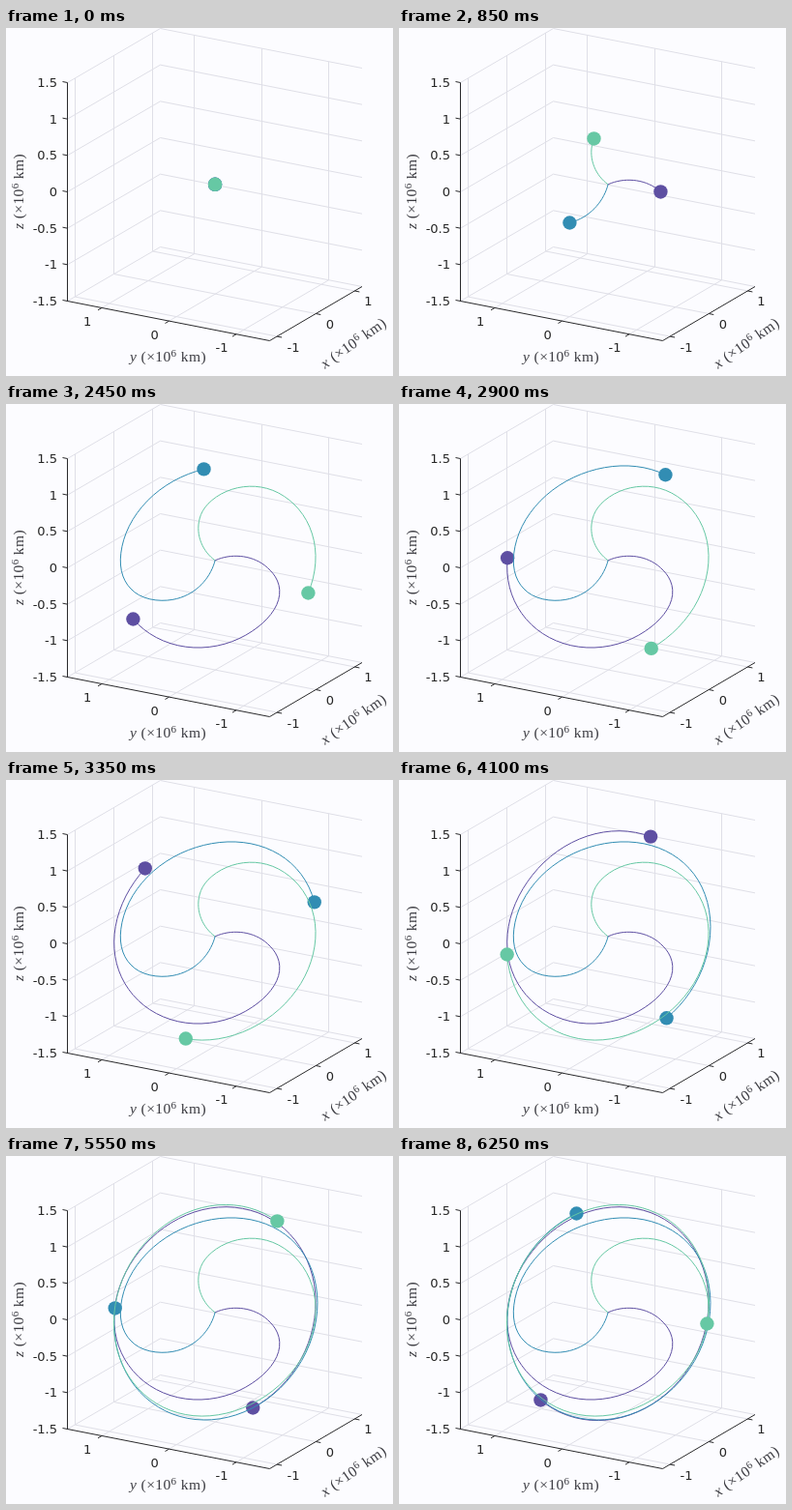
An HTML page for the animation above (6.3 s loop, 400 px wide and 360 px high).

```html
<!DOCTYPE html>
<html lang="en">
<head>
<meta charset="utf-8">
<title>Three-body orbit plot</title>
<style>
  html, body { margin: 0; width: 100%; height: 100%; overflow: hidden; background: #fcfcff; }
  svg { display: block; width: 400px; height: 360px; }
  .grid line { stroke: #dfdfe7; stroke-width: 1; }
  .axes line { stroke: #2a2a2c; stroke-width: 1; }
  .ticks text { font: 13px "DejaVu Sans", sans-serif; fill: #262626; }
  .names text { font: 15.5px "Liberation Serif", serif; letter-spacing: 0.4px; fill: #3c3c42; text-anchor: middle; }
  .var { font-style: italic; }
  .sup { font-size: 11px; }
  .trail { fill: none; stroke-width: 1; stroke-linejoin: round; }
</style>
</head>
<body>
<svg viewBox="0 0 400 360">
  <g class="grid"></g>
  <g class="axes"></g>
  <g class="ticks"></g>
  <g class="names"></g>
  <g class="craft"></g>
</svg>
<script>
const LOOP = 6300, STEP = 50, TURN = Math.PI * 2;

function add(parent, tag, attrs, text) {
  const el = document.createElementNS("http://www.w3.org/2000/svg", tag);
  for (const key in attrs) el.setAttribute(key, attrs[key]);
  if (text !== undefined) el.textContent = text;
  return parent.appendChild(el);
}
const group = name => document.querySelector("." + name);
const line = (parent, x1, y1, x2, y2) => add(parent, "line", { x1, y1, x2, y2 });

const grid = group("grid"), axes = group("axes"), ticks = group("ticks");
const label = (x, y, text, anchor = "middle") =>
  add(ticks, "text", { x, y, "text-anchor": anchor }, text);

// Box corners on the floor
const left = [63.5, 282.5], front = [272.5, 323.5], right = [368, 267.5], back = [159.5, 226.5];
const height = 226;

const mix = (a, b, k) => [a[0] + (b[0] - a[0]) * k, a[1] + (b[1] - a[1]) * k];

// A grid line across the floor that continues up the wall
function floorAndWall([fx, fy], [bx, by]) {
  const x = Math.floor(bx) + 0.5;
  line(grid, fx, fy, bx, by);
  line(grid, x, by, x, by - height);
}

// z levels on the two back walls
[-1.5, -1, -0.5, 0, 0.5, 1, 1.5].forEach((z, i) => {
  const up = i * height / 6;
  line(grid, left[0], left[1] - up, back[0], back[1] - up);
  line(grid, back[0], back[1] - up, right[0], right[1] - up);
  line(axes, left[0], left[1] - up, left[0] - 5, left[1] - up - 1);
  label(53, left[1] - up + 4.5, z, "end");
});

// y values run from left to front
[1, 0, -1].forEach((v, i) => {
  const k = 0.17 + i * 0.3325;
  const [x, y] = mix(left, front, k);
  floorAndWall([x, y], mix(back, right, k));
  line(axes, x, y, x - 4, y + 2.4);
  label(x - 15, y + 18.7, v);
});

// x values run from front to right
[[-1, 297, 335], [0, 335, 311], [1, 374.5, 287]].forEach(([v, tx, ty], i) => {
  const k = 0.08 + i * 0.42;
  const [x, y] = mix(front, right, k);
  floorAndWall([x, y], mix(left, back, k));
  line(axes, x, y, x + 5, y + 1);
  label(tx, ty, v);
});

line(axes, left[0], left[1] + 0.5, left[0], left[1] - height);
line(axes, ...left, ...front);
line(axes, ...front, ...right);

function axisName(name, x, y, angle) {
  const text = add(group("names"), "text", { transform: `translate(${x} ${y}) rotate(${angle})` });
  add(text, "tspan", { class: "var" }, name);
  add(text, "tspan", {}, " (×10");
  add(text, "tspan", { class: "sup", dy: -5 }, "6");
  add(text, "tspan", { dy: 5 }, " km)");
}
axisName("z", 18, 169, -90);
axisName("y", 167.5, 345, 0);
axisName("x", 362, 330, -35);

// Formation over time: ms, radius, angle in degrees, distortion (two parts)
const keys = [
  [0, 0, -150, 0, 0],
  [850, 0.4956, -116.6, -0.005, 0.042],
  [1250, 0.747, -90.5, 0.04, 0.083],
  [1650, 0.855, -60, 0.072, 0.062],
  [2450, 0.932, 13.6, 0.077, -0.02],
  [3350, 0.985, 95, -0.01, -0.022],
  [4800, 0.9943, 227.8, 0, 0],
  [6250, 1, 360, 0, 0]
];

function slope(i, col) {
  const a = keys[Math.max(i - 1, 0)], b = keys[Math.min(i + 1, keys.length - 1)];
  return (b[col] - a[col]) / (b[0] - a[0]);
}

function value(t, col) {
  let i = 0;
  while (i < keys.length - 2 && t > keys[i + 1][0]) i++;
  const a = keys[i], b = keys[i + 1], span = b[0] - a[0];
  const u = (t - a[0]) / span, u2 = u * u, u3 = u2 * u;
  return a[col] * (2 * u3 - 3 * u2 + 1) + b[col] * (3 * u2 - 2 * u3)
    + span * (slope(i, col) * (u3 - 2 * u2 + u) + slope(i + 1, col) * (u3 - u2));
}

// Position on the projected orbit plane for one of three evenly spaced craft
function place(t, k) {
  const turn = k * TURN / 3;
  const r = value(t, 1), angle = value(t, 2) * TURN / 360 + turn;
  const gx = value(t, 3), gy = value(t, 4);
  const c = r * Math.cos(angle) + gx * Math.cos(turn) + gy * Math.sin(turn);
  const s = r * Math.sin(angle) + gy * Math.cos(turn) - gx * Math.sin(turn);
  return [216.1 + 102.3 * c - 21.4 * s, 161.8 + 11.7 * c + 111.4 * s];
}

const craft = [
  { k: 1, color: "#5e4fa2" },
  { k: 2, color: "#328db3" },
  { k: 0, color: "#66c8a4" }
].map(({ k, color }) => ({
  points: Array.from({ length: LOOP / STEP }, (_, n) => place(n * STEP, k)),
  path: add(group("craft"), "path", { class: "trail", stroke: color }),
  dot: add(group("craft"), "circle", { r: 7.2, fill: color })
}));

const start = performance.now();
let shown = -1;

function draw(now) {
  const n = Math.floor((Math.max(0, now - start) % LOOP) / STEP);
  if (n !== shown) {
    shown = n;
    for (const { points, path, dot } of craft) {
      const trail = points.slice(0, n + 1).map(p => p.map(v => v.toFixed(2)).join(" "));
      path.setAttribute("d", "M" + trail.join("L"));
      dot.setAttribute("cx", points[n][0]);
      dot.setAttribute("cy", points[n][1]);
    }
  }
  requestAnimationFrame(draw);
}
draw(start);
</script>
</body>
</html>
```
